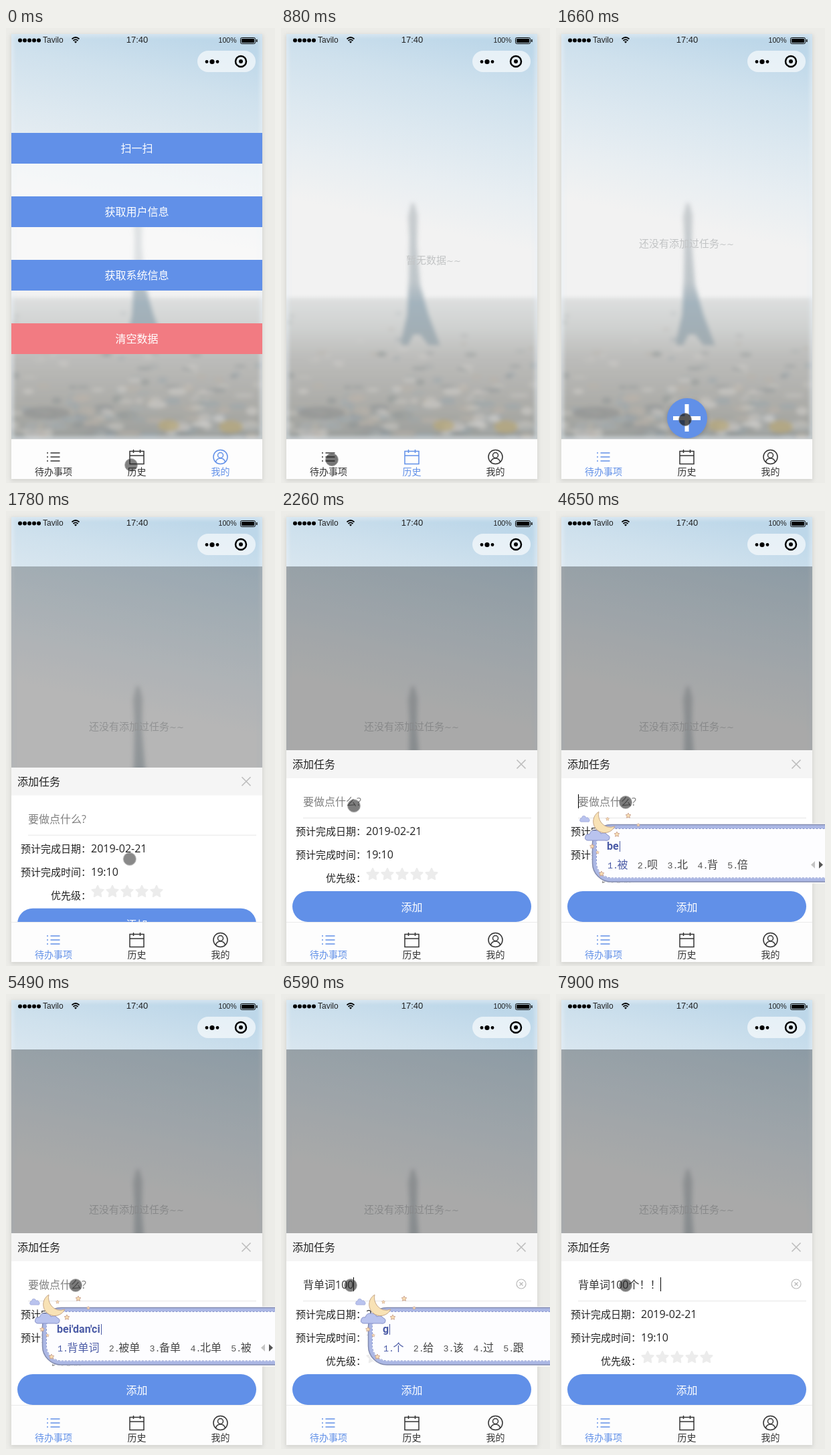
These frames come from a looping animation (402 by 681 pixels, 8 s). An HTML page:

```html
<!DOCTYPE html>
<html lang="zh-CN">
<head>
<meta charset="utf-8">
<title>待办事项</title>
<style>
html, body { margin: 0; width: 100%; height: 100%; overflow: hidden; background: #ecece8; }
svg { display: block; width: 402px; height: 681px; font-family: "Open Sans", "Noto Sans CJK SC", "Noto Sans CJK", sans-serif; }
text { white-space: pre; }
.mid { text-anchor: middle; }
.status { font-family: "Liberation Sans", sans-serif; fill: #222; }
.hint { font-size: 15px; fill: #c2c4c5; }
.hint tspan { font: 13px "DejaVu Sans", sans-serif; }
.label { font-size: 15px; fill: #222; }
.field { font-size: 16px; fill: #222; }
.button { font-size: 16px; fill: #fff; text-anchor: middle; }
.tab { color: #333; }
.tab .icon { fill: none; stroke: currentColor; stroke-width: 1.5; }
.tab text { font-size: 14px; fill: currentColor; text-anchor: middle; }
.num { font: 13.33px "Liberation Mono", monospace; }

/* one loop lasts 8 s, so 1% is 80 ms */
.step { animation: 8s step-end infinite; }
#tabTodo { animation-name: tabTodo; }
#tabHistory { animation-name: tabHistory; }
#tabMe { animation-name: tabMe; }
#pageTodo { animation-name: pageTodo; }
#pageHistory { animation-name: pageHistory; }
#pageMe { animation-name: pageMe; }
#dim { animation: dim 8s linear infinite; }
#sheet { animation: sheet 8s linear infinite; }
#cursor { animation: cursor 8s linear infinite; }

@keyframes tabTodo { 0% { color: #333 } 11.75%, 100% { color: #6190e8 } }
@keyframes tabHistory { 0% { color: #333 } 2.625% { color: #6190e8 } 11.75%, 100% { color: #333 } }
@keyframes tabMe { 0% { color: #6190e8 } 2.625%, 100% { color: #333 } }
@keyframes pageTodo { 0% { opacity: 0 } 11.75%, 100% { opacity: 1 } }
@keyframes pageHistory { 0% { opacity: 0 } 2.625% { opacity: 1 } 11.75%, 100% { opacity: 0 } }
@keyframes pageMe { 0% { opacity: 1 } 2.625%, 100% { opacity: 0 } }
@keyframes dim { 0%, 21.25% { opacity: 0 } 22.25% { opacity: .25 } 23.4%, 100% { opacity: .3 } }
@keyframes sheet {
  0% { transform: translateY(257px) }
  21.25% { transform: translateY(257px); animation-timing-function: cubic-bezier(.33, 1, .68, 1) }
  23.125%, 100% { transform: translateY(0) }
}
@keyframes cursor {
  0% { transform: translate(187px, 654px); opacity: .55; animation-timing-function: step-end }
  .75% { transform: translate(181px, 653px); opacity: .55 }
  2.625% { transform: translate(181px, 653px); opacity: .55; animation-timing-function: ease-in-out }
  8.625% { transform: translate(78px, 646px); opacity: .55 }
  11%, 12% { transform: translate(76px, 646px); opacity: .6; animation-timing-function: ease-in-out }
  18.5% { transform: translate(193px, 586px); opacity: .6 }
  20%, 21.25% { transform: translate(193px, 586px); opacity: .75 }
  22.25% { transform: translate(185px, 521px); opacity: .52; animation-timing-function: ease-out }
  29.75%, 100% { transform: translate(104px, 436px); opacity: .58 }
}
</style>
</head>
<body>
<svg viewBox="0 0 402 681">
  <defs>
    <linearGradient id="sky" gradientUnits="userSpaceOnUse" x1="235" y1="5" x2="172" y2="290">
      <stop offset="0" stop-color="#bdd7e9"/><stop offset=".25" stop-color="#cfe1ed"/>
      <stop offset=".5" stop-color="#dce8f0"/><stop offset=".75" stop-color="#e8eef2"/>
      <stop offset="1" stop-color="#f2f2f2"/>
    </linearGradient>
    <linearGradient id="ground" x2="0" y2="1">
      <stop offset="0" stop-color="#dddfdf"/><stop offset=".2" stop-color="#cfd1d0"/>
      <stop offset=".4" stop-color="#bcbcba"/><stop offset=".75" stop-color="#aaaaa6"/>
      <stop offset="1" stop-color="#969a98"/>
    </linearGradient>
    <linearGradient id="steel" x2="0" y2="1">
      <stop offset="0" stop-color="#c9cdd0"/><stop offset=".55" stop-color="#bfc6ca"/>
      <stop offset=".7" stop-color="#a3b3bd"/><stop offset="1" stop-color="#a2acb1"/>
    </linearGradient>
    <filter id="blur" x="-20%" y="-20%" width="140%" height="140%"><feGaussianBlur stdDeviation="3"/></filter>
    <clipPath id="screen"><rect x="8" y="9" width="375" height="606"/></clipPath>
    <path id="star" stroke-width="2" stroke-linejoin="round" d="M0-9 2.6-3.6 8.6-2.8 4.3 1.4 5.3 7.3 0 4.5-5.3 7.3-4.3 1.4-8.6-2.8-2.6-3.6Z"/>
    <path id="cloud" d="M-15 7Q-20 6-18 1-17-3-12-2-10-9-3-8 3-8 5-3 11-6 15-1 20 1 17 6 15 8 11 7Z"/>
  </defs>

  <rect width="402" height="681" fill="#ecece8"/>
  <rect x="7" y="10" width="377" height="668" fill="#9a9a96" opacity=".3" filter="url(#blur)"/>

  <g clip-path="url(#screen)">
    <rect x="8" y="9" width="375" height="606" fill="url(#sky)"/>
    <g filter="url(#blur)">
      <rect x="-10" y="404" width="420" height="225" fill="url(#ground)"/>
      <g id="roofs"></g>
      <path d="M195 262h4l5 18-1 45 5 60 13 45 17 45h-18l-12-16-10 0-8 16h-9l-2-5 9-40 3-55 1-60-2-33Z" fill="url(#steel)"/>
    </g>
    <rect x="8" y="9" width="375" height="606" fill="none" stroke="#e8f1f7" stroke-width="6" opacity=".7" filter="url(#blur)"/>

    <g id="pageMe" class="step">
      <rect x="8" y="203" width="375" height="144" fill="#fff" opacity=".45"/>
      <g id="actions"></g>
    </g>
    <g id="pageHistory" class="step">
      <text class="hint" x="187" y="353">暂无数据<tspan>~~</tspan></text>
    </g>
    <g id="pageTodo" class="step">
      <text class="hint" x="124" y="328">还没有添加过任务<tspan>~~</tspan></text>
      <circle cx="196" cy="586" r="30" fill="#445" opacity=".3" filter="url(#blur)"/>
      <circle cx="196" cy="584" r="30" fill="#6190e8"/>
      <path d="M175 584h41M195.500 563v41" stroke="#fff" stroke-width="6"/>
    </g>

    <rect id="dim" x="8" y="83" width="375" height="532"/>
    <g id="sheet">
      <rect x="8" y="358" width="375" height="257" fill="#fff"/>
      <rect x="8" y="358" width="375" height="42" fill="#f5f5f5"/>
      <text class="field" x="17" y="385">添加任务</text>
      <path d="M352.500 372.500l13 13m0-13l-13 13" stroke="#bdbdbd" stroke-width="1.600"/>
      <text id="entry" class="field" x="33" y="441"></text>
      <rect id="caret" x="33" y="424" width="1" height="21"/>
      <g id="clear" fill="none" stroke="#b8b8b8" stroke-width="1.200">
        <circle cx="359" cy="434" r="7"/><path d="M356.500 431.500l5 5m0-5l-5 5"/>
      </g>
      <path d="M33 459.500h341" stroke="#e6e6e6"/>
      <text class="label" x="22" y="485">预计完成日期：</text><text class="field" x="127" y="485">2019-02-21</text>
      <text class="label" x="22" y="520">预计完成时间：</text><text class="field" x="127" y="520">19:10</text>
      <text class="label" x="67" y="555">优先级：</text>
      <g id="rating" fill="#ececec" stroke="#ececec"></g>
      <rect x="17" y="569" width="357" height="46" rx="23" fill="#6190e8"/>
      <text class="button" x="195.500" y="599">添加</text>
    </g>
  </g>

  <g class="status">
    <path d="M21 18.500h.01m6.990 0h.01m6.990 0h.01m6.990 0h.01m6.990 0h.01" stroke="#000" stroke-width="6" stroke-linecap="round"/>
    <text x="55" y="22" font-size="12">Tavilo</text>
    <path d="M98.500 16.500q5.500-5 11 0M100.500 19q3.500-3.200 7 0" fill="none" stroke="#000" stroke-width="1.700"/>
    <path d="M102 20.500q2-1.500 4 0l-2 2.300z" fill="#000"/>
    <text class="mid" x="196" y="22" font-size="13">17:40</text>
    <text x="317.500" y="22" font-size="10.600">100%</text>
    <rect x="350.500" y="14.500" width="22" height="9" rx="2" fill="none" stroke="#000"/>
    <path d="M352 16h19v6h-19zM374 17h1.500v4H374z" fill="#000"/>
  </g>
  <rect x="286" y="34" width="87" height="32" rx="16" fill="#fff" opacity=".62"/>
  <circle cx="300" cy="50.500" r="2.400"/><circle cx="308" cy="50.500" r="3.600"/><circle cx="316" cy="50.500" r="2.400"/>
  <circle cx="351" cy="50" r="8" fill="none" stroke="#000" stroke-width="2.500"/><circle cx="351" cy="50" r="3"/>

  <rect x="8" y="615" width="375" height="60" fill="#fdfdfd"/>
  <path d="M8 615.500h375" stroke="#ebebeb"/>
  <g id="tabTodo" class="tab step">
    <path class="icon" d="M61 636h2m3.500 0h14M61 642h2m3.500 0h14M61 648h2m3.500 0h14"/>
    <text x="71" y="669">待办事项</text>
  </g>
  <g id="tabHistory" class="tab step">
    <path class="icon" d="M185 633.500h21v19h-21zM185 640h21M190.500 631v5m10-5v5"/>
    <text x="195.500" y="669">历史</text>
  </g>
  <g id="tabMe" class="tab step">
    <g class="icon"><circle cx="320.500" cy="642" r="10.500"/><circle cx="320.500" cy="639.500" r="4"/><path d="M313.500 649.500q1.500-5.500 7-5.500t7 5.500"/></g>
    <text x="320.500" y="669">我的</text>
  </g>

  <g id="cursor"><circle r="9.500" fill="#1c1c1c" stroke="#777" stroke-width=".8"/></g>

  <g id="ime">
    <rect x="52.500" y="467.500" width="500" height="90" rx="30" fill="#fff" opacity=".8"/>
    <rect x="54.500" y="469.500" width="500" height="85.500" rx="28" fill="#abb7e4" stroke="#838cb0" stroke-width="1.500"/>
    <rect x="60" y="475" width="500" height="74.500" rx="23" fill="#fdfdff"/>
    <rect x="60.500" y="475.500" width="500" height="73.500" rx="23" fill="none" stroke="#8795cf" stroke-dasharray="3 2"/>
    <g fill="#b9c3ee" stroke="#8993c9">
      <use href="#cloud" transform="translate(43 461) scale(.4 .6)"/>
      <use href="#cloud" transform="translate(62 486)"/>
    </g>
    <path d="M64 450a17 17 0 1 0 24 22q-12 4-20-5-6-8-4-17Z" fill="#f8e2b5" stroke="#c5a688"/>
    <g id="sparks" fill="#f9dfb4" stroke="#c99f8a"></g>
    <text id="pinyin" x="76" y="507" font-size="16" fill="#4b5ba6" style="font-family:Roboto,sans-serif;font-weight:700"></text>
    <rect id="imeCaret" y="494" width="1" height="16" fill="#4b5ba6"/>
    <text id="choices" y="535" font-size="16" style="font-family:'Noto Sans CJK SC','Noto Sans CJK',sans-serif;font-weight:300"></text>
    <path d="M387 524v11l-6-5.500z" fill="#c4c4c4"/><path d="M393 524v11l6-5.500z" fill="#555"/>
  </g>
</svg>
<script>
const LOOP = 8000;
const $ = id => document.getElementById(id);

// static parts
let seed = 11;
const rnd = () => (seed = seed * 16807 % 2147483647) / 2147483647;
const tones = ['#d2d0cc', '#a9adad', '#bab3a9', '#8f9596', '#c6c4c0', '#9ba6ac'];
let roofs = '';
for (let i = 0; i < 170; i++) {
  const near = Math.sqrt(rnd());
  roofs += `<ellipse cx="${8 + rnd() * 375}" cy="${425 + near * 190}" rx="${5 + near * 15 * rnd()}" ry="${2 + near * 6 * rnd()}" fill="${tones[rnd() * 6 | 0]}" opacity="${.3 + near * .35}"/>`;
}
roofs += '<g fill="#b9a97a" opacity=".7"><ellipse cx="243" cy="595" rx="16" ry="9"/><ellipse cx="336" cy="597" rx="18" ry="10"/></g>';
roofs += '<ellipse cx="60" cy="576" rx="36" ry="9" fill="#8c9090" opacity=".6"/>';
$('roofs').innerHTML = roofs;

$('actions').innerHTML = ['扫一扫', '获取用户信息', '获取系统信息', '清空数据'].map((name, i) =>
  `<rect x="8" y="${157 + i * 95}" width="375" height="46" fill="${i < 3 ? '#6190e8' : '#f27b82'}"/>
   <text class="button" x="195.5" y="${186 + i * 95}">${name}</text>`).join('');

const star = (x, y, k) => `<use href="#star" transform="translate(${x} ${y}) scale(${k})"/>`;
$('rating').innerHTML = [0, 1, 2, 3, 4].map(i => star(137 + i * 22, 544, 1)).join('');
$('sparks').innerHTML = [[77, 461, .3], [108, 456, .45], [123, 470, .28], [91, 484, .45], [54, 502, .4], [62, 511, .28], [68, 543, .45]]
  .map(s => star(...s)).join('');

// typing: [start in ms, value]
const entry = [[0, ''], [5730, '背单词'], [6150, '背单词1'], [6260, '背单词10'], [6380, '背单词100'],
  [7110, '背单词100个'], [7420, '背单词100个！'], [7660, '背单词100个！！']];
const caret = [[0, 0], [2630, 1], [3060, 0], [3540, 1], [4040, 0], [4540, 1], [5040, 0], [5730, 1], [6870, 0], [7110, 1]];
const pinyin = [[0, ''], [4540, 'b', '不 吧 把 别 被'], [4650, 'be', '被 呗 北 背 倍'], [4760, 'bei', '被 北 背 杯 备'],
  [4870, "bei'd", '被动 北斗 北大 背 被'], [4980, "bei'da", '北大 被打 被 北 背'], [5090, "bei'dan", '被单 备单 北单 背 被'],
  [5250, "bei'dan'c", '背单词 被单 备单 北单 被'], [5370, "bei'dan'ci", '背单词 被单 备单 北单 被'],
  [5730, ''], [6590, 'g', '个 给 该 过 跟'], [6650, 'ge', '个 各 哥 歌 格'], [7110, '']];

const at = (list, t) => list.findLast(item => item[0] <= t);
const show = (id, on) => $(id).style.visibility = on ? 'visible' : 'hidden';

function choices(words) {
  let x = 77;
  return words.split(' ').map((word, i) => {
    const item = `<tspan class="num" x="${x}" fill="${i ? '#555' : '#4b5ba6'}">${i + 1}.</tspan><tspan x="${x + 14.5}" fill="${i ? '#444' : '#4b5ba6'}">${word}</tspan>`;
    x += 28.8 + word.length * 16;
    return item;
  }).join('');
}

let start;
function draw(now) {
  start ??= now;
  const t = (now - start) % LOOP;
  const value = at(entry, t)[1];
  const [, spelled, words] = at(pinyin, t);

  $('entry').textContent = value || '要做点什么?';
  $('entry').style.fill = value ? '#333' : '#808080';
  $('caret').setAttribute('x', 33 + (value ? Math.round($('entry').getComputedTextLength()) : 0));
  show('caret', at(caret, t)[1]);
  show('clear', value);

  show('ime', spelled);
  if (spelled) {
    $('ime').setAttribute('transform', `translate(${value ? 76 : 0} 0)`);
    $('pinyin').textContent = spelled;
    $('imeCaret').setAttribute('x', 77 + Math.round($('pinyin').getComputedTextLength()));
    $('choices').innerHTML = choices(words);
  }
  requestAnimationFrame(draw);
}
requestAnimationFrame(draw);
</script>
</body>
</html>
```
